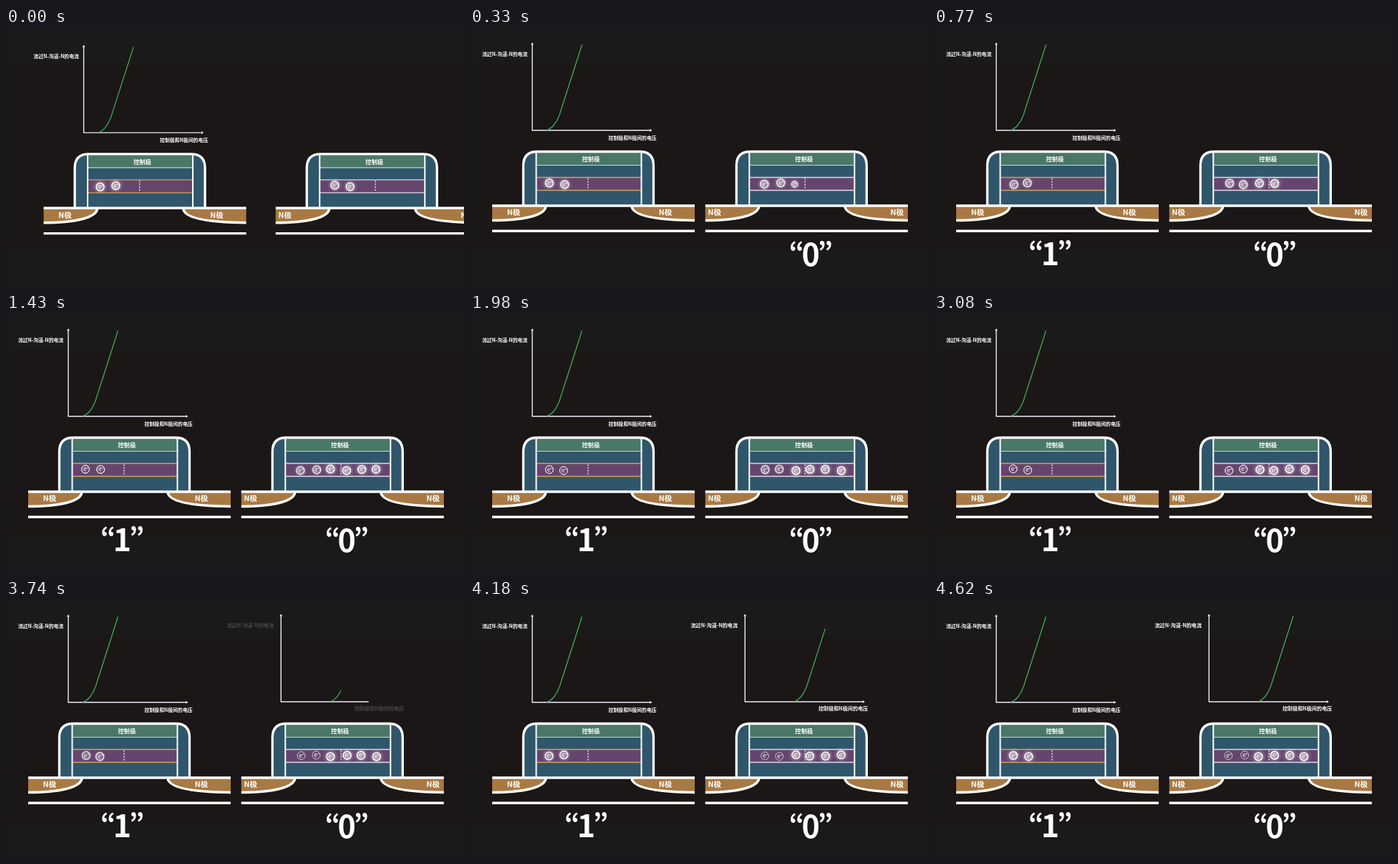
Write an HTML page with a canvas that moves like this. It is 640x360 px and loops after 4730 ms.

```html
<!DOCTYPE html>
<html lang="zh-CN">
<head>
<meta charset="utf-8">
<style>
html, body { margin: 0; width: 100%; height: 100%; overflow: hidden; background: #1a1a1a; }
canvas { display: block; }
</style>
</head>
<body>
<canvas width="640" height="360"></canvas>
<script>
const ctx = document.querySelector('canvas').getContext('2d');
const LOOP = 4730, STEP = 110;
const HAN = '"Noto Sans CJK SC", sans-serif';
const LATIN = '"Noto Sans CJK KR", "Noto Sans", sans-serif';
const BLUE = '#2f566b', GREEN = '#4a7767', PURPLE = '#65456d', BROWN = '#a97943';

const ramp = (t, from, to) => Math.min(1, Math.max(0, (t - from) / (to - from)));
const easeOut = u => 1 - (1 - u) ** 2;

function shape(d, fill, stroke, width) {
  const path = new Path2D(d);
  if (fill) { ctx.fillStyle = fill; ctx.fill(path); }
  if (stroke) { ctx.strokeStyle = stroke; ctx.lineWidth = width; ctx.stroke(path); }
}

function label(text, x, y, size, align = 'center', weight = 'bold', family = HAN) {
  ctx.font = `${weight} ${size}px ${family}`;
  ctx.textAlign = align;
  ctx.fillStyle = '#fff';
  ctx.fillText(text, x, y);
}

function partial(d, length, shown, color, width) {
  if (shown <= 0) return;
  ctx.setLineDash([length * shown, 1000]);
  shape(d, null, color, width);
  ctx.setLineDash([]);
}

function graph(x, y, curveX, axes, curve) {
  const height = 121, width = 166, top = y - height, end = x + width;
  const color = '#eeeaf4';
  partial(`M${x} ${top}V${y}H${end}`, height + width, axes, color, 1.4);
  if (axes > 0) shape(`M${x - 2} ${top + 1.5}l2 -3l2 3Z`, color);
  if (axes >= 1) shape(`M${end - 1.5} ${y - 2}l3 2l-3 2Z`, color);
  partial(`M${curveX} ${y - .3}c7 -1.5 14 -10 18 -21.2L${curveX + 49.5} ${y - 119.5}`, 132, curve, '#45a857', 1.3);
}

function device(x, channelLine, dashX, leftLabel, rightLabel) {
  ctx.save();
  ctx.translate(x, 0);
  const wells = ['M31 268.5C73 268.5 106 262 106 248', 'M314 268.5C264 268 226 263 226 248'];
  shape(wells[0] + 'H31Z', BROWN);
  shape(wells[1] + 'H314Z', BROWN);
  shape(wells.join(''), null, '#fff', 3.5);

  const body = 'M74.5 248V192Q74.5 172.5 94 172.5H237Q256.5 172.5 256.5 192V248';
  shape(body, BLUE);
  shape('M93 174H239V191H93Z', GREEN);
  shape('M93 208.5H239V226.5H93Z', PURPLE);
  shape('M93 191.5H239', null, '#c5d8d7', 1.2);
  shape('M93 208.5H239M93 226.5H239', null, channelLine, 1.3);
  ctx.setLineDash([2.3, 1.7]);
  shape(`M${dashX} 209.5V225`, null, '#eee6f0', 1.3);
  ctx.setLineDash([]);
  shape('M92.5 173V247M239.5 173V247', null, '#fff', 2);
  shape(body, null, '#fff', 3.3);
  shape('M31 248H314M31 283.3H314', null, '#fff', 3.4);

  label('控制极', 169, 186.3, 8.3);
  label('N极', leftLabel, 261.4, 10.6);
  label('N极', rightLabel, 261.2, 10.6);
  ctx.restore();
}

function electron(x, y, scale, glow) {
  ctx.save();
  ctx.translate(x, y);
  ctx.scale(scale, scale);
  ctx.shadowColor = '#fff';
  ctx.shadowBlur = 5 * glow;
  const ring = 'M-5.5 0a5.5 5.5 0 1 0 11 0a5.5 5.5 0 1 0 -11 0';
  shape(ring, `rgba(255,255,255,${.2 * glow})`, `rgba(255,255,255,${.75 + .25 * glow})`, .9 + .6 * glow);
  ctx.shadowBlur = 0;
  label('e', -.8, 2.6, 8.5, 'center', 'normal', LATIN);
  shape('M1.6 -1.8H4', null, '#fff', .9);
  ctx.restore();
}

// A row of evenly spaced electrons that jitter, each with its own phase
function electrons(t, count, x, gap, size, glow) {
  for (let i = 0; i < count; i++) {
    const phase = x + i * 2.4;
    const dx = 1.1 * Math.sin(t / 170 + phase);
    const dy = 1.2 * Math.cos(t / 140 + phase * 1.7);
    electron(x + i * gap + dx, 217.3 + dy, size(i), glow(i));
  }
}

function quoted(digit, x, y, opacity) {
  const part = (text, dx, dy, size) => label(text, x + dx, y + dy, size, 'center', 900, LATIN);
  ctx.globalAlpha = opacity;
  part('“', -20, -6, 37);
  part(digit, 0, 0, 43);
  part('”', 20, -6, 37);
  ctx.globalAlpha = 1;
}

function draw(t) {
  ctx.fillStyle = '#1a1a1a';
  ctx.fillRect(0, 0, 640, 360);
  ctx.fillStyle = '#1b1717';
  ctx.fillRect(0, 51, 640, 259);

  const slide = 1 - easeOut(ramp(t, 0, 330));
  const pulse = (.5 + .5 * Math.cos(2 * Math.PI * t / LOOP)) ** 2;
  ctx.save();
  ctx.translate(21.6 * slide, 3.3 * slide);
  graph(87, 142.8, 107, 1, 1);
  label('流过N-沟道-N的电流', 17, 38.6, 6.85, 'left');
  label('控制极和N极间的电压', 193.5, 155.5, 6.9, 'left');
  device(0, '#d9a04f', 165, 61, 273);
  electrons(t, 2, 111, 20.5, () => 1, () => pulse);
  ctx.restore();

  const fade = .9 * (1 - ramp(t, 0, 3700));
  const grow = i => i < 2 ? 1 : ramp(t, 293 * i - 406, 293 * i - 206);
  ctx.save();
  ctx.translate(48 * slide, 3.3 * slide);
  device(297.8, '#e2d8e6', 170.3, 44, 299);
  electrons(t, 6, 412, 21.2, grow, i => i < 2 ? fade : 1);
  ctx.restore();

  graph(384.3, 142, 452.5, easeOut(ramp(t, 3380, 3970)), ramp(t, 3630, 4270));
  ctx.globalAlpha = ramp(t, 3630, 4180);
  label('流过N-沟道-N的电流', 308.5, 38.2, 7.1, 'left');
  label('控制极和N极间的电压', 487, 154, 7.1, 'left');
  ctx.globalAlpha = 1;

  quoted('0', 476.3, 332, ramp(t, 110, 330));
  quoted('1', 162.5, 331, ramp(t, 500, 740));
}

function tick() {
  const t = performance.now() % LOOP;
  draw(Math.floor(t / STEP) * STEP);
  requestAnimationFrame(tick);
}
tick();
</script>
</body>
</html>
```
